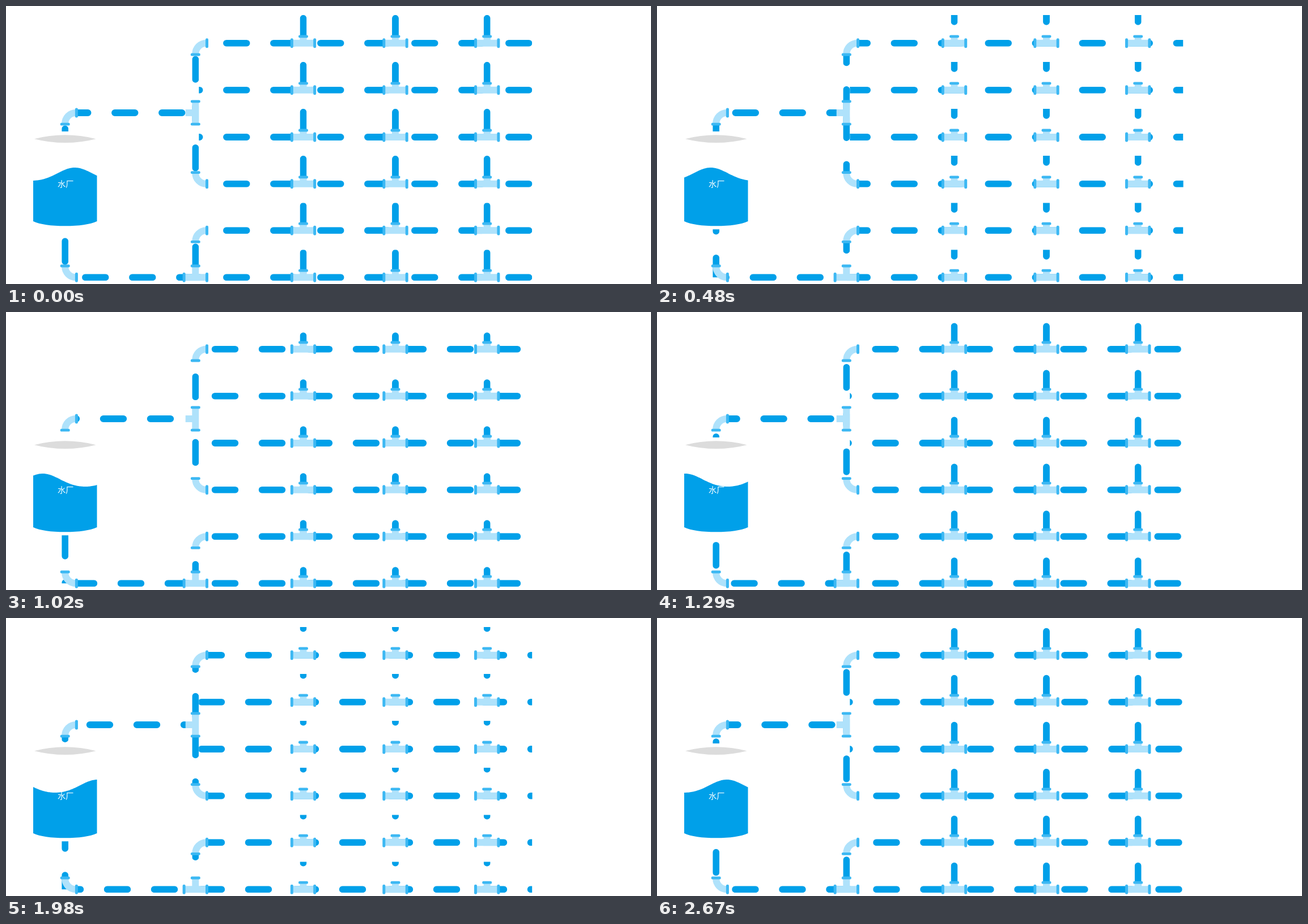
Recreate the animation shown at these times as an HTML page. Size 1138 by 492 pixels, loop 2700 ms.

```html
<!DOCTYPE html>
<html lang="zh">
<head>
<meta charset="utf-8">
<title>水厂</title>
<style>
html, body { margin: 0; width: 100%; height: 100%; overflow: hidden; background: #fff; }
svg { display: block; }
text { font: 14.2px "Noto Sans CJK SC", "Noto Sans CJK", sans-serif; }
</style>
</head>
<body>
<svg width="1138" height="492" viewBox="0 0 1138 492">
  <path fill="#dcdcdc" d="M50 235.2Q104.3 221.4 158.6 235.2Q104.3 249 50 235.2Z"/>
  <path id="water" fill="#00a0e9"/>
  <text x="105.3" y="320" fill="#fff" text-anchor="middle">水厂</text>
  <g id="flow" fill="none" stroke="#00a0e9" stroke-width="11.85" stroke-linecap="round" stroke-dasharray="35.55 47.45"></g>
  <g id="joints" fill="none" stroke="#afe2fb" stroke-width="12"></g>
  <g id="rims" fill="#3cb8f3"></g>
</svg>
<script>
const LOOP = 2700, PERIOD = 83, DASH = 47.4, CAP = 5.93;
const $ = id => document.getElementById(id);

function add(parent, tag, attrs) {
  const el = document.createElementNS('http://www.w3.org/2000/svg', tag);
  for (const k in attrs) el.setAttribute(k, attrs[k]);
  $(parent).appendChild(el);
  return el;
}

// A clipped window onto a long dashed line; `tail` is the rear edge of one dash at time 0.
function pipe(x, y, w, h, dir, tail, line) {
  const start = tail + dir * (CAP - 12 * PERIOD);
  const box = add('flow', 'svg', { x, y, width: w, height: h, viewBox: `${x} ${y} ${w} ${h}` });
  const path = add('flow', 'path', { d: line(start, start + dir * 2200) });
  box.appendChild(path);
}
const across = (x1, x2, y, tail) =>
  pipe(x1, y - 6, x2 - x1, 12, 1, tail, (a, b) => `M${a} ${y}H${b}`);
const down = (x, y1, y2, tail, dir = 1) =>
  pipe(x - 6, y1, 12, y2 - y1, dir, tail, (a, b) => `M${x} ${a}V${b}`);
const up = (x, y1, y2, top) => down(x, y1, y2, top + DASH, -1);

const joint = d => add('joints', 'path', { d });
function rim(x, y, upright) {
  const w = upright ? 5 : 17, h = upright ? 17 : 4.8;
  add('rims', 'rect', { x: x - w / 2, y: y - h / 2, width: w, height: h, rx: 2.2 });
}

// Bend joining a vertical pipe at (x, y + s*20) to a horizontal one at (x + 20, y)
function elbow(x, y, s) {
  joint(`M${x} ${y + s * 19.5}A19 19 0 0 ${s > 0 ? 1 : 0} ${x + 19} ${y}h1`);
  rim(x, y + s * 20.2, false);
  rim(x + 20.2, y, true);
}
function tee(x, y, rise) {
  joint(`M${x - 20} ${y}h40M${x} ${y}v${-rise}`);
  rim(x - 20.2, y, true);
  rim(x + 20.2, y, true);
  rim(x, y - rise, false);
}

const rows = [65.8, 148.8, 232, 314.8, 397.2, 480.2];
const starts = [354, 340.3, 340.3, 354, 354, 124];
rows.forEach((y, i) => {
  across(starts[i], i === 3 ? 928.6 : 928.2, y, 383);
  const top = 16 + PERIOD * i;
  for (const x of [524.5, 687, 848.7]) {
    up(x, top + (i > 3 ? .5 : 0), y - 4, top);
    tee(x, y, 12);
  }
});

across(124, 317, 189, 186);
up(104.2, 209, 222, 211.5);
down(104.2, 395.3, 480.2, 410.5);
up(334.3, 86, 189, 88.5);
down(334.3, 189, 294, 245);
up(334.3, 417, 462, 420.5);

elbow(104.2, 189, 1);
elbow(104.2, 480.2, -1);
elbow(334.3, 65.8, 1);
elbow(334.3, 314.8, -1);
elbow(334.3, 397.2, 1);
tee(334.3, 480.2, 20.2);
joint('M334.3 169V209M316.7 189H334');
rim(334.3, 168.9, false);
rim(334.3, 209.1, false);

function waterPath(p) {
  let d = 'M48 381';
  for (let x = 48; x <= 160.5; x += 1.5) {
    const a = 2 * Math.PI * ((x - 121.5) / 150 + p);
    d += `L${x} ${(298.5 - 11.5 * Math.cos(a) - Math.cos(2 * a)).toFixed(2)}`;
  }
  return d + 'V381Q142 389.3 104.3 389.3Q66 389.3 48 381Z';
}

const t0 = performance.now();
function draw(now) {
  const p = Math.max(0, now - t0) % LOOP / LOOP;
  $('flow').setAttribute('stroke-dashoffset', -2 * PERIOD * p);
  $('water').setAttribute('d', waterPath(p));
  requestAnimationFrame(draw);
}
draw(t0);
</script>
</body>
</html>
```
